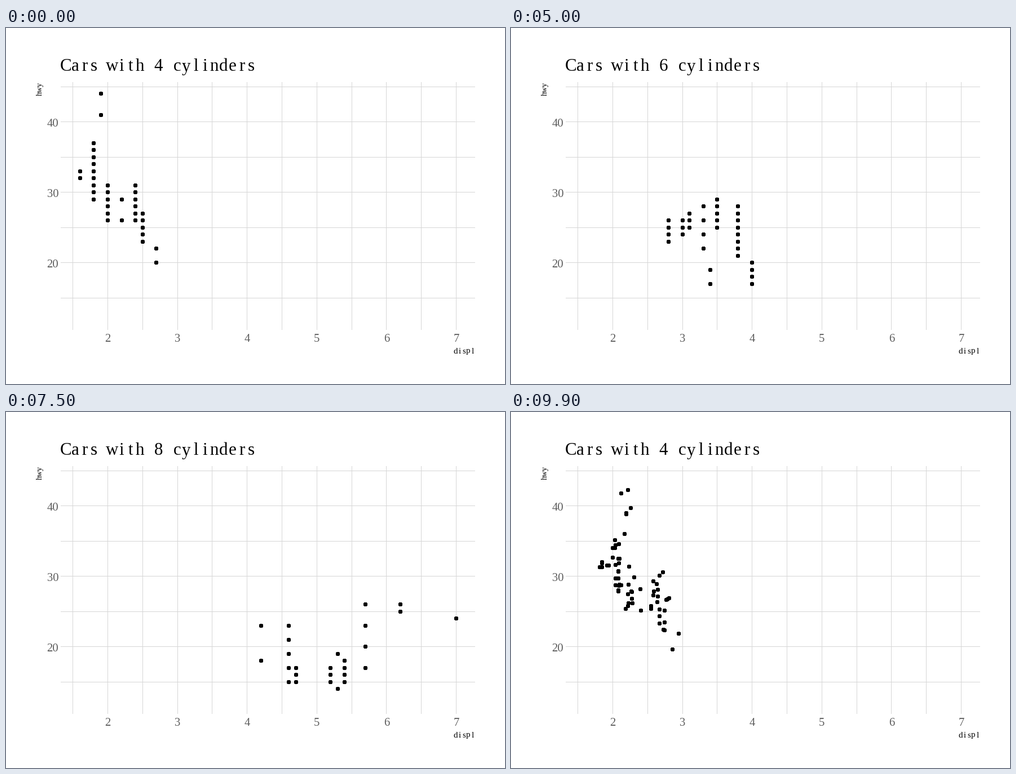
Animation, 885 px wide and 632 px high, one loop 10 s. Source, as a matplotlib script:

```python
import numpy as np
import matplotlib.pyplot as plt
from matplotlib.animation import FuncAnimation

WIDTH, HEIGHT, DPI = 885, 632, 64
PT = 72 / DPI                       # points per pixel
FRAMES, INTERVAL = 100, 100
STARTS = (12, 38, 63, 88)           # frame at which each transition leaves its state
LENGTHS = (13, 12, 12, 12)
CYLINDERS = (4, 5, 6, 8)
GRID, TICK = "#d6d6d6", "#5c5c5c"

rng = np.random.default_rng(4)


def px(displ):
    return 118.65 + (displ - 1.5) * 123.6


def py(hwy):
    return 166.6 + (40 - hwy) * 12.5


def on_pixel(values):
    return np.floor(values) + 0.5


def column(displ, low, high, step=1):
    """Evenly spaced mileages at one engine size."""
    return [(px(displ), py(hwy)) for hwy in range(low, high + 1, step)]


def fleet(count, *columns):
    """Share the cars out over all columns, in random order."""
    cells = np.concatenate(columns)
    return rng.permutation(np.resize(cells, (count, 2)))


STATES = [
    fleet(81, column(1.6, 32, 33), column(1.8, 29, 37), column(1.9, 41, 44, 3),
          column(2.0, 26, 31), column(2.2, 26, 29, 3), column(2.4, 26, 31),
          column(2.5, 23, 27), column(2.7, 20, 22, 2)),
    fleet(4, column(2.5, 28, 29)),
    fleet(79, column(2.8, 23, 26), column(3.0, 24, 26), column(3.1, 25, 27),
          column(3.3, 22, 28, 2), column(3.4, 17, 19, 2), column(3.5, 25, 29),
          column(3.8, 21, 28), column(4.0, 17, 20)),
    fleet(70, column(4.2, 18, 23, 5), column(4.6, 15, 23, 2), column(4.7, 15, 17),
          column(5.2, 15, 17), column(5.3, 14, 19, 5), column(5.4, 15, 18),
          column(5.7, 17, 26, 3), column(6.2, 25, 26), column(7.0, 24, 24)),
]

plt.rcParams["font.family"] = "Liberation Serif"
fig = plt.figure(figsize=(WIDTH / DPI, HEIGHT / DPI), dpi=DPI, facecolor="white")
ax = fig.add_axes([0, 0, 1, 1])
ax.set(xlim=(0, WIDTH), ylim=(HEIGHT, 0))
ax.axis("off")


def put(x, y, text, size, color="black", ha="center", rotation=0):
    return ax.text(x, y, text, fontsize=size * PT, color=color, ha=ha, va="baseline",
                   rotation=rotation, rotation_mode="anchor")


def put_spaced(x, y, text, size, pitch, rotation=0):
    """Set a line with one letter per equal cell, across or upwards."""
    across, up = (0, 1) if rotation else (1, 0)
    return [put(x + across * (i + 0.5) * pitch, y - up * (i + 0.5) * pitch,
                char, size, rotation=rotation) for i, char in enumerate(text)]


# Grid on whole pixels
for lines in (ax.vlines(on_pixel(px(np.arange(1.5, 7.1, 0.5))), 96, 536,
                        colors=GRID, linewidths=PT),
              ax.hlines(on_pixel(py(np.arange(15, 46, 5))), 97, 832,
                        colors=GRID, linewidths=PT)):
    lines.set_snap(False)

# Labels
for displ in range(2, 8):
    put(px(displ), 557, str(displ), 20.8, TICK)
for hwy in (20, 30, 40):
    put(93, py(hwy) + 8, str(hwy), 20.8, TICK, ha="right")
title = put_spaced(98, 76.5, "Cars with 4 cylinders", 31, 16.43)
put_spaced(793, 577.5, "displ", 15, 7.7)
put_spaced(64, 120, "hwy", 14, 7.7, rotation=90)
digit = title[10]

dots = ax.scatter([], [], s=(7 * PT) ** 2, c="black", edgecolors="none",
                  antialiased=False, zorder=3)
dots.set_snap(False)


def draw(frame):
    step, i = min(((frame - start) % FRAMES, i) for i, start in enumerate(STARTS))
    after = (i + 1) % len(STATES)
    t = step / LENGTHS[i]
    if t >= 1:
        points = STATES[after]
    else:
        # Cars without a partner wait in place until the move ends
        points = STATES[i].copy()
        n = min(len(points), len(STATES[after]))
        points[:n] += t * (STATES[after][:n] - points[:n])
    dots.set_offsets(on_pixel(points))
    digit.set_text(str(CYLINDERS[after if t > 0.5 else i]))
    return dots, digit


anim = FuncAnimation(fig, draw, frames=FRAMES, interval=INTERVAL,
                     repeat=True, repeat_delay=0, blit=False)
plt.show()
```
